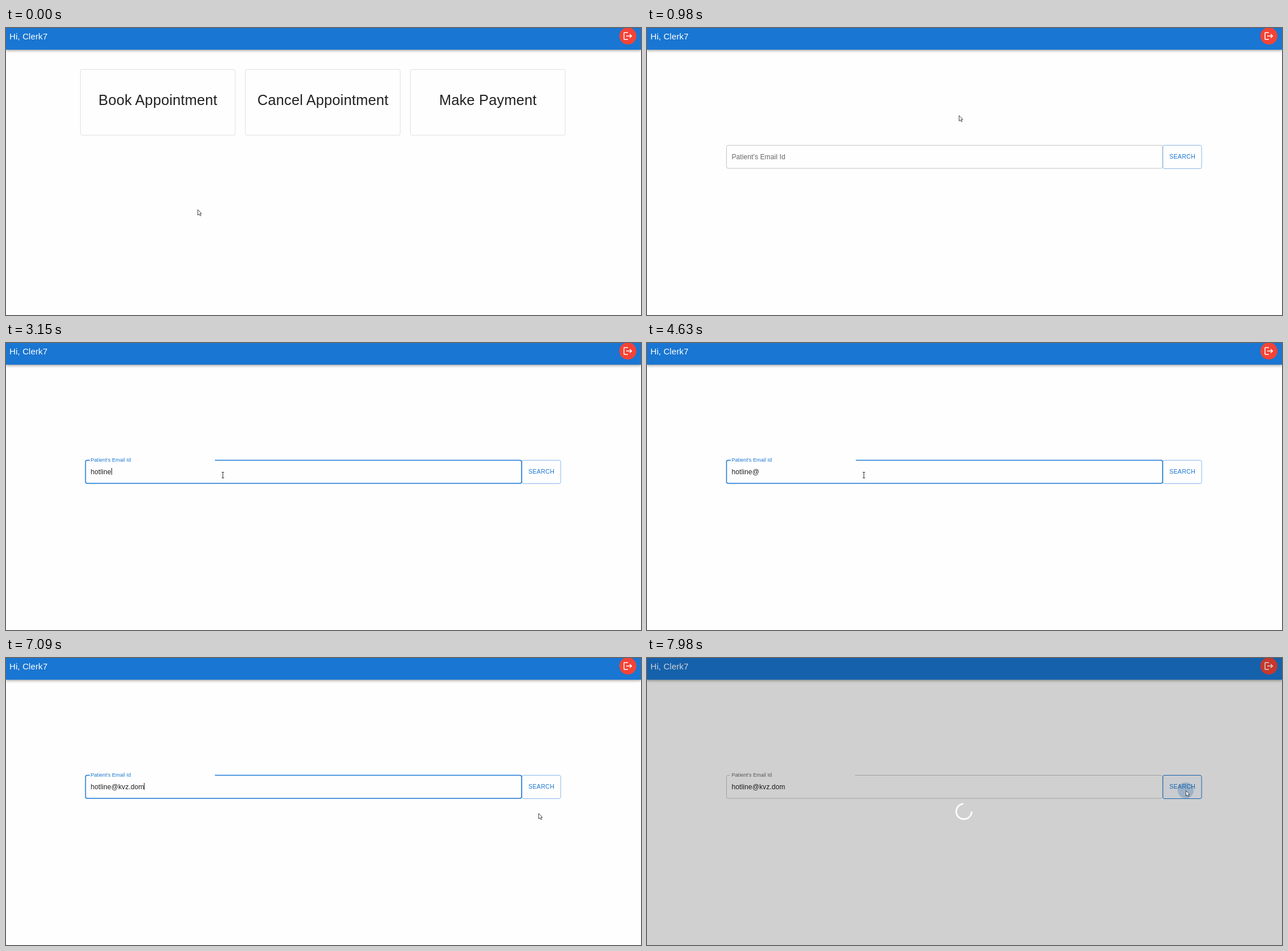
Recreate the animation shown at these times as an HTML page. Size 1114x503 px, loop 8 s.

```html
<!DOCTYPE html>
<html lang="en">
<head>
<meta charset="utf-8">
<title>Staff desk</title>
<style>
  html, body { margin: 0; width: 100%; height: 100%; overflow: hidden; background: #fefefe; }
  svg { display: block; font-family: "Liberation Sans", Arial, sans-serif; fill: #212121; }
  header { position: absolute; width: 1114px; height: 38px; background: #1976d2;
    box-shadow: 0 1.5px 3px -.75px #0003, 0 3px 3.75px #00000024, 0 .75px 7.5px #0000001f; }
  svg { position: absolute; }
  .card rect { fill: none; stroke: #0000001f; }
  .card text { font-size: 25.3px; letter-spacing: .00735em; text-anchor: middle; }
  #typed, #label { letter-spacing: .00938em; }
  #typed { font-size: 12px; }
  #outline { fill: none; }
  #search text { font-size: 10.5px; letter-spacing: .02857em; fill: #1976d2; }
</style>
</head>
<body>
<header></header>
<svg width="1114" height="503">
  <text x="6" y="19.5" font-size="15" letter-spacing=".1" fill="#fff">Hi, Clerk7</text>
  <circle cx="1091" cy="14" r="15" fill="#f44336"/>
  <path transform="translate(1082 5) scale(.75)" fill="#fff" d="m17 7-1.41 1.41L18.17 11H8v2h10.17l-2.58 2.58L17 17l5-5zM4 5h8V3H4c-1.1 0-2 .9-2 2v14c0 1.1.9 2 2 2h8v-2H4V5z"/>

  <g id="cards"></g>

  <g id="form">
    <path id="outline"/>
    <text id="label">Patient's Email Id</text>
    <text id="typed" x="148.5" y="229.5"></text>
    <rect id="caret" y="219" width="1" height="12"/>
    <g id="search">
      <rect id="button" x="905" y="205.5" width="68" height="41" rx="3"/>
      <text x="916.5" y="228.8">SEARCH</text>
      <circle id="ripple" cx="945" cy="232" r="14" fill="#1976d2" opacity=".25"/>
    </g>
  </g>

  <g id="busy">
    <rect width="1114" height="503" opacity=".18" fill="#000"/>
    <path d="M569.5 269A13.5 13.5 0 1 1 555 255.5" fill="none" stroke="#fff" stroke-width="2.7"/>
  </g>

  <g id="mouse">
    <path id="arrow" d="M.5 .5V10L2.8 8l1.6 3.3 1.5-.7L4.4 7.3H7Z" fill="#fff" stroke="#333" stroke-width=".9"/>
    <path id="beam" d="M-2-4.5H2M0-4.5V5.5M-2 5.5H2" fill="none" stroke="#333"/>
  </g>
</svg>
<script>
const $ = id => document.getElementById(id);
const LOOP = 8000, OPEN = 980, FOCUS = 1340, BLUR = 7830, BUSY = 7980;
const EMAIL = "hotline@kvz.dom";
const KEYS = [1490, 1570, 1650, 2230, 2890, 3020, 3150, 4100, 4890, 5090, 5350, 5620, 5890, 6020, 6230];
const CARET_ON = [FOCUS, ...KEYS, 7090];
const CARET_OFF = [2100, 2760, 3680, 4630, 6760, 7630];
// time, x, y
const MOUSE = [[70, 336, 318], [620, 547, 153], [OPEN, 547, 153], [1280, 380, 231],
  [7089.9, 380, 231], [7090, 934, 272], [7150, 934, 272], [7560, 945, 232]];

const ease = p => p * p * (3 - 2 * p);
const ramp = (t, start, length) => ease(Math.min(1, Math.max(0, (t - start) / length)));
const mix = (a, b, p) => a + (b - a) * p;
const show = (id, on) => $(id).style.display = on ? "" : "none";
const set = (id, attrs) => { for (const k in attrs) $(id).setAttribute(k, attrs[k]); };
const latest = (times, t) => Math.max(0, ...times.filter(x => x <= t));

$("cards").innerHTML = ["Book Appointment", "Cancel Appointment", "Make Payment"].map((title, i) => {
  const x = 130.5 + 289.5 * i;
  return `<g class="card" id="card${i}"><rect x="${x}" y="72.5" width="271.5" height="115.5" rx="3"/>
    <text x="${x + 136}" y="135.3">${title}</text></g>`;
}).join("");

function mouseAt(t) {
  let [, x, y] = MOUSE[0];
  MOUSE.slice(1).forEach(([end, toX, toY], i) => {
    const start = MOUSE[i][0], p = ramp(t, start, end - start);
    x = mix(x, toX, p);
    y = mix(y, toY, p);
  });
  return [x, y];
}

function drawCards(t) {
  const p = ramp(t, 500, 290), s = 1 + .05 * p;
  set("card1", { transform: `translate(556 130.3) scale(${s}) translate(-556 -130.3)` });
  $("card1").firstChild.style.fill = `rgba(237,237,237,${p})`;
}

function drawField(t) {
  const focused = t >= FOCUS && t < BLUR;
  const lift = ramp(t, FOCUS, 150);
  const tint = lift * (1 - ramp(t, BLUR, 145));
  const left = lift ? (focused ? 147 : 145.5) : 142.5;
  set("outline", {
    d: `M${left + 219.5 * lift} 205.5H901.5a3 3 0 0 1 3 3V243a3 3 0 0 1-3 3H142.5a3 3 0 0 1-3-3V208.5a3 3 0 0 1 3-3H${left}`,
    stroke: focused ? "#1976d2" : "#0000003b",
    "stroke-width": focused ? 1.5 : 1
  });
  set("label", {
    x: 148.4, y: mix(229.5, 208, lift), "font-size": mix(12, 9, lift),
    fill: `rgb(${mix(102, 25, tint)},${mix(102, 118, tint)},${mix(102, 210, tint)})`
  });
  $("typed").textContent = EMAIL.slice(0, KEYS.filter(k => k <= t).length);
  set("caret", { x: Math.round(148.5 + $("typed").getComputedTextLength()) });
  show("caret", focused && latest(CARET_ON, t) > latest(CARET_OFF, t));
}

function draw() {
  const t = performance.now() % LOOP;
  const [x, y] = mouseAt(t);
  const opened = t >= OPEN;
  show("cards", !opened);
  show("form", opened);
  if (opened) drawField(t); else drawCards(t);

  const overSearch = opened && x > 905 && y < 246;
  set("button", {
    fill: overSearch ? "#1976d20a" : "none",
    stroke: overSearch ? "#1976d2" : "#1976d280"
  });
  show("ripple", t >= BUSY);
  show("busy", t >= BUSY);

  const overField = opened && x < 904 && y > 205 && y < 247;
  set("mouse", { transform: `translate(${Math.round(x) + (overField ? .5 : 0)} ${Math.round(y)})` });
  show("arrow", !overField);
  show("beam", overField);
  requestAnimationFrame(draw);
}
draw();
</script>
</body>
</html>
```
